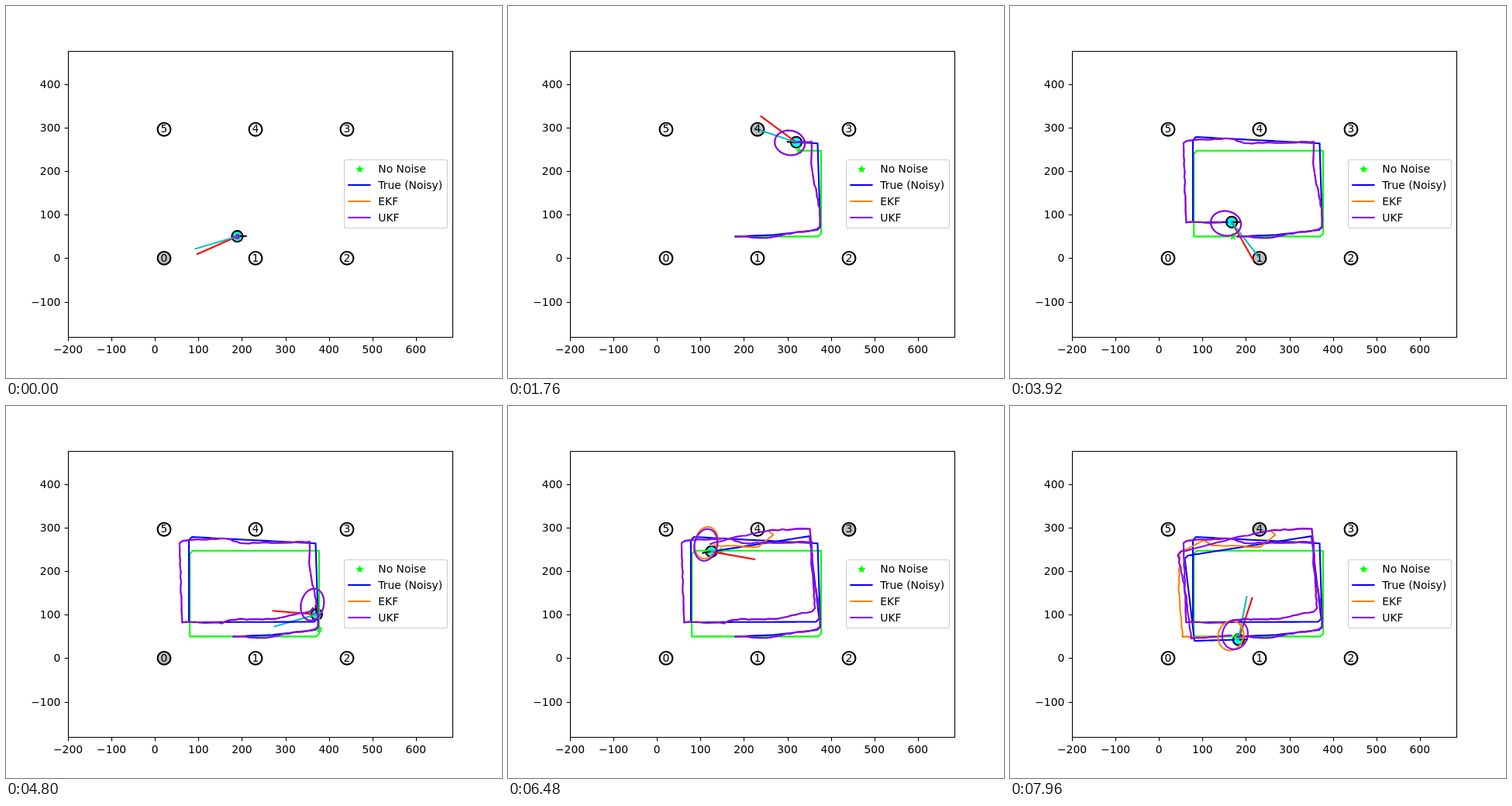
These frames come from a looping animation (640 by 480 pixels, 8 s). An HTML page with a canvas:

```html
<!DOCTYPE html>
<html lang="en">
<head>
<meta charset="utf-8">
<title>Robot localization</title>
<style>
  html, body { margin: 0; width: 100%; height: 100%; overflow: hidden; background: #fff; }
  canvas { display: block; }
</style>
</head>
<body>
<canvas id="plot" width="640" height="480"></canvas>
<script>
const ctx = document.getElementById('plot').getContext('2d');
const LOOP = 8000, TICK = 40, STEPS = 200;
const UNIT = 0.5611, X0 = 192.2, Y0 = 325.45;   // data units to pixels
const LINE = 2.08, STRIDE = 5.615, RAY = 56.4;
const LIME = '#00ff00', BLUE = '#0000ff', ORANGE = '#ff8000', PURPLE = '#8000ff';
const FONT = '13.89px "DejaVu Sans", sans-serif';
const MARKS = [[204, 325.4], [322, 325.4], [440, 325.4], [440, 159.2], [322, 159.2], [204, 159.2]];

// A lap takes 100 steps. After these steps the robot turns: cut corner (offset) or on the spot (0).
const BEND = { 19: 4, 39: 0, 69: -4, 89: 0 };

// Key points: step, x, y
const IDEAL_KEYS = [
  [0, 293.4, 297.4], [19, 400.1, 297.4], [39, 404, 186.8], [69, 241.2, 186.8],
  [89, 237.2, 297.4], [119, 400.1, 297.4], [139, 404, 186.8], [169, 241.2, 186.8],
  [189, 237.2, 297.4], [200, 293.4, 297.4]
];
const TRUE_KEYS = [
  [0, 293.4, 297.4], [10, 344, 295.3], [19, 399, 289], [39, 399.5, 177.3], [69, 240, 169],
  [89, 236, 279], [119, 397.5, 278.5], [139, 389, 168], [169, 229.5, 193], [189, 238, 303],
  [200, 294.8, 301.5]
];
const SHARED_KEYS = [
  [0, 293.4, 297.4], [8, 334, 299], [13, 364, 293.5], [19, 399, 288.5], [24, 402, 262],
  [34, 391.5, 209], [39, 392, 175.5], [56, 303, 177], [60, 284, 171], [69, 228, 173.5],
  [89, 227, 279], [99, 279, 280], [101, 290, 275.5], [112, 347, 274.5], [119, 392, 265],
  [131, 393, 203], [139, 390, 158], [149, 336, 160.5]
];
const UKF_TAIL = [[157, 290, 170.5], [169, 221, 188], [180, 227, 246], [189, 234, 300], [200, 290, 295.5]];
const EKF_TAIL = [
  [150, 342, 166], [151, 323, 182], [162, 262, 180], [164, 250, 173], [169, 223, 187],
  [179, 217.5, 238], [189, 223, 298], [200, 284.5, 297]
];

function at(keys, s) {
  let i = 1;
  while (i < keys.length - 1 && keys[i][0] < s) i++;
  const [s0, x0, y0] = keys[i - 1], [s1, x1, y1] = keys[i];
  const f = (s - s0) / (s1 - s0);
  return [x0 + (x1 - x0) * f, y0 + (y1 - y0) * f];
}

function rand(n) {
  const v = Math.sin(n * 127.1 + 11.7) * 43758.5453;
  return v - Math.floor(v);
}

// One point per step, with the turns added and some seeded jitter
function route(corners, jitter = 0) {
  const keys = corners.flatMap(key => {
    const [s, x, y] = key, d = BEND[s % 100];
    return d === undefined ? [key] : [key, [s + 1, x + d, y - d]];
  });
  return Array.from({ length: STEPS + 1 }, (_, s) => {
    const [x, y] = at(keys, s);
    return [x + jitter * (rand(s) - 0.5), y + jitter * (rand(s + 500) - 0.5)];
  });
}

const ideal = route(IDEAL_KEYS);
const truth = route(TRUE_KEYS);
const ukf = route([...SHARED_KEYS, ...UKF_TAIL], 1.4);
const ekf = route([...SHARED_KEYS, ...EKF_TAIL], 1.4);

// Evenly scattered error of up to 28 degrees
function bearingError(s) {
  const u = (s * 0.2375 + 0.1325) % 1;
  return (2 * u - 1) * 28 * Math.PI / 180;
}

// Uncertainty grows at first, then sways as the sighted marks change
function spread(s) {
  const grow = 1 - Math.exp(-s / 8), sway = Math.cos((s - 7) * Math.PI / 3);
  return [(18 - 3 * sway) * grow, (17.5 + 3 * sway) * grow, -0.15 * sway];
}

function heading(s) {
  const turned = (s - 1) % 100 in BEND;
  const a = truth[turned ? s : s - 1], b = truth[turned ? s + 1 : s];
  return Math.atan2(b[1] - a[1], b[0] - a[0]);
}

function stroke(points, color, width = LINE, closed = false) {
  ctx.beginPath();
  points.forEach(([x, y]) => ctx.lineTo(x, y));
  if (closed) ctx.closePath();
  ctx.strokeStyle = color;
  ctx.lineWidth = width;
  ctx.stroke();
}

function ray([x, y], angle, length, color) {
  stroke([[x, y], [x + length * Math.cos(angle), y + length * Math.sin(angle)]], color);
}

function disc([x, y], r, fill) {
  ctx.beginPath();
  ctx.arc(x, y, r, 0, 2 * Math.PI);
  ctx.fillStyle = fill;
  ctx.fill();
  ctx.strokeStyle = '#000';
  ctx.lineWidth = LINE;
  ctx.stroke();
}

function star([x, y]) {
  ctx.beginPath();
  for (let i = 0; i < 10; i++) {
    const r = i % 2 ? 1.6 : 4.17, a = i * Math.PI / 5;
    ctx.lineTo(x + r * Math.sin(a), y - r * Math.cos(a));
  }
  ctx.closePath();
  ctx.fillStyle = ctx.strokeStyle = LIME;
  ctx.lineWidth = 1.2;
  ctx.fill();
  ctx.stroke();
}

function ellipse([x, y], [w, h, rho], color) {
  const lag = Math.acos(rho), points = [];
  for (let i = 0; i < 60; i++) {
    const a = i * Math.PI / 30;
    points.push([x + w * Math.cos(a), y + h * Math.cos(a - lag)]);
  }
  stroke(points, color, LINE, true);
}

function label(text, x, y, align = 'center') {
  ctx.fillStyle = '#000';
  ctx.textAlign = align;
  ctx.fillText(text, x, Math.round(y));
}

function drawAxes() {
  ctx.lineCap = 'butt';
  ctx.strokeStyle = '#000';
  ctx.lineWidth = 1.11;
  ctx.strokeRect(80.5, 58.5, 496, 369);
  const name = v => String(v).replace('-', '\u2212');
  for (let v = -200; v <= 600; v += 100) {
    const x = X0 + v * UNIT, px = Math.round(x) + 0.5;
    stroke([[px, 427.5], [px, 432.4]], '#000', 1.11);
    label(name(v), x, 448);
  }
  for (let v = -100; v <= 400; v += 100) {
    const y = Y0 - v * UNIT, py = Math.round(y) + 0.5;
    stroke([[75.6, py], [80.5, py]], '#000', 1.11);
    label(name(v), 70.3, y + 5, 'right');
  }
}

function drawLegend() {
  ctx.beginPath();
  ctx.roundRect(436.5, 198.5, 133, 88, 2.8);
  ctx.fillStyle = 'rgba(255,255,255,0.8)';
  ctx.fill();
  ctx.strokeStyle = '#ccc';
  ctx.lineWidth = 1.1;
  ctx.stroke();
  star([456.4, 210.7]);
  [BLUE, ORANGE, PURPLE].forEach((color, i) => {
    const y = 231 + i * 21;
    stroke([[442.3, y], [469.5, y]], color);
  });
  ['No Noise', 'True (Noisy)', 'EKF', 'UKF'].forEach((t, i) => label(t, 480.3, 215 + i * 21, 'left'));
}

function draw(s) {
  ctx.fillStyle = '#fff';
  ctx.fillRect(0, 0, 640, 480);
  ctx.font = FONT;
  ctx.lineJoin = 'round';
  ctx.textBaseline = 'alphabetic';

  const seen = Math.floor(s / 2) % MARKS.length;
  const robot = truth[s], mark = MARKS[seen];
  MARKS.forEach((p, i) => disc(p, 8.4, i === seen ? '#bfbfbf' : '#fff'));
  disc(robot, 7.1, '#00ffff');

  // Trails end one step behind the current pose
  ctx.lineCap = 'square';
  stroke(ideal.slice(0, s), LIME);
  star(ideal[s]);

  ray(robot, heading(s), 2 * STRIDE, '#000');
  const bearing = Math.atan2(mark[1] - robot[1], mark[0] - robot[0]);
  ray(robot, bearing + bearingError(s), RAY, '#ff0000');
  ray(robot, bearing, RAY, '#00bfbf');

  [[truth, BLUE], [ekf, ORANGE], [ukf, PURPLE]].forEach(([path, color]) => stroke(path.slice(0, s), color));
  ellipse(ekf[s], spread(s), ORANGE);
  ellipse(ukf[s], spread(s), PURPLE);

  MARKS.forEach(([x, y], i) => label(i, x, y + 4.2));
  drawAxes();
  ctx.lineCap = 'square';
  drawLegend();
}

const start = performance.now();
function tick() {
  const t = (performance.now() - start) % LOOP;
  draw(Math.floor(t / TICK) + 1);
  requestAnimationFrame(tick);
}
tick();
</script>
</body>
</html>
```
